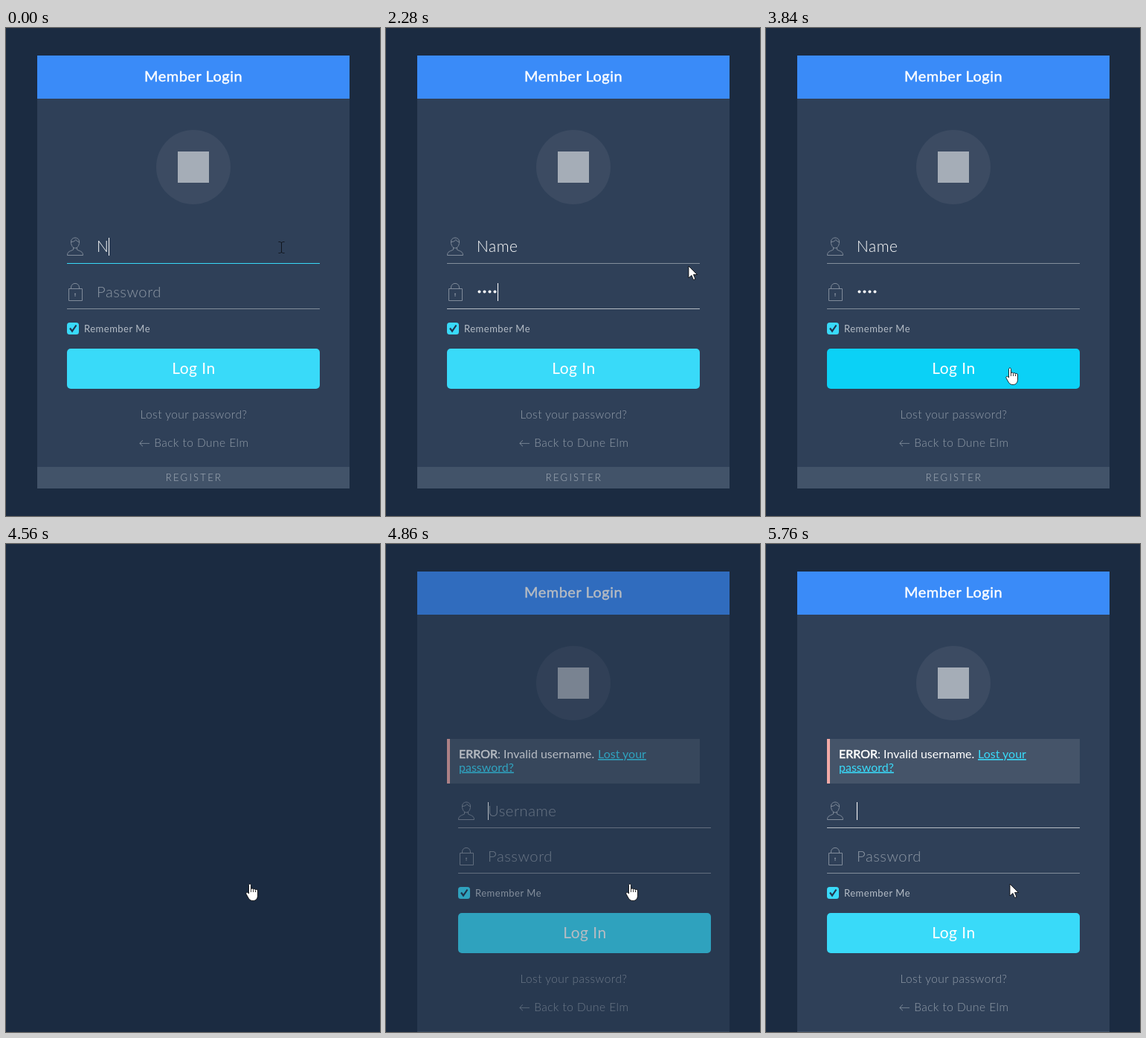
Write an HTML page that moves like this. It is 503 by 656 pixels and loops after 5.88 s.

```html
<!DOCTYPE html>
<html lang="en">
<head>
<meta charset="utf-8">
<title>Member Login</title>
<style>
  html, body { margin: 0; width: 100%; height: 100%; overflow: hidden; background: #1b2b41; }
  svg { display: block; width: 503px; height: 656px; }
  text { font-family: Lato, "Open Sans", sans-serif; white-space: pre; }
  .mid { text-anchor: middle; }
  .title { font-size: 20px; letter-spacing: .5px; fill: #fff; stroke: #fff; stroke-width: .4; }
  .typed { font-size: 21px; font-weight: 300; letter-spacing: .5px; fill: #fff; }
  .hint { font-size: 20.3px; font-weight: 300; letter-spacing: .5px; fill: #8d97a4; }
  .small { font-size: 13px; letter-spacing: .5px; fill: #b4bcc6; }
  .login { font-size: 21px; letter-spacing: .5px; fill: #fff; }
  .link { font-size: 15.5px; font-weight: 300; letter-spacing: .45px; fill: #929ca9; }
  .register { font-size: 13px; font-weight: 300; letter-spacing: 2.3px; fill: #a9b2bd; }
  .notice { font-size: 16px; fill: #fff; }
  .notice .strong { stroke: #fff; stroke-width: .5; }
  .notice .cyan { fill: #39daf9; text-decoration: underline; }
  .icon { fill: none; stroke: #808b9a; stroke-width: 1; }
  .beam { fill: none; stroke: #10151d; stroke-width: 1; }
  .white { fill: #fff; stroke: #000; stroke-width: .8; stroke-linejoin: round; }
</style>
</head>
<body>
<svg viewBox="0 0 503 656">
  <g id="card">
    <rect id="panel" x="42" y="37" width="420" height="582" fill="#2f4058"/>
    <rect x="42" y="37" width="420" height="58" fill="#3a8bf8"/>
    <text class="title mid" x="252" y="72">Member Login</text>
    <circle cx="252" cy="187" r="50" fill="#3c4b62"/>
    <rect x="231" y="166" width="42" height="42" fill="#a5adb7"/>

    <g id="error" class="notice">
      <rect x="82" y="262" width="340" height="60" fill="#455469"/>
      <rect x="82" y="262" width="4" height="60" fill="#f2aaa6"/>
      <text x="98" y="288"><tspan class="strong">ERROR</tspan>: Invalid username.</text>
      <text class="cyan" x="285" y="288">Lost your</text>
      <text class="cyan" x="98" y="305.5">password?</text>
    </g>

    <g id="lower">
      <g id="form">
        <path class="icon" d="M87.5 288C87 280 99 280 98.5 288C98.5 292 96 296 93 296S87.5 292 87.5 288ZM88 287.5C91 287.5 93 286 94 284.5C95 286.5 97 287.5 98.500 287.5M90.500 295V298C87 300 82.500 300 82.500 305.500H103.500C103.500 300 99 300 95.500 298V295"/>
        <text id="name" class="typed" x="122" y="301"></text>
        <text id="userHint" class="hint" x="122" y="301">Username</text>
        <rect id="userLine" x="82" y="316" width="340" height="1"/>

        <path class="icon" d="M84.500 350.500H102.500V366.500H84.500ZM87.500 350.500V349C87.500 341.500 98.500 341.500 98.500 349V350.500M93 356.500V361M92 357.500H94"/>
        <text id="passHint" class="hint" x="122" y="362">Password</text>
        <g id="dots" fill="#fff">
          <circle cx="125.500" cy="354.500" r="2"/>
          <circle cx="132.500" cy="354.500" r="2"/>
          <circle cx="139.500" cy="354.500" r="2"/>
          <circle cx="146.500" cy="354.500" r="2"/>
        </g>
        <rect id="passLine" x="82" y="377" width="340" height="1"/>
        <rect id="caret" width="1" height="24" fill="#fff"/>

        <rect x="82" y="396" width="16" height="16" rx="3.500" fill="#39daf9"/>
        <path d="M86 403.500L89 407.500L94.500 399.500" fill="none" stroke="#22364f" stroke-width="2.200"/>
        <text class="small" x="105" y="409">Remember Me</text>
        <rect id="button" x="82" y="431" width="340" height="54" rx="5"/>
        <text class="login mid" x="252.500" y="465">Log In</text>
      </g>
      <text class="link mid" x="252.500" y="525">Lost your password?</text>
      <text class="link mid" x="252.500" y="563">← Back to Dune Elm</text>
      <rect x="42" y="590" width="420" height="29" fill="#425369"/>
      <text class="register mid" x="253" y="609">REGISTER</text>
    </g>
  </g>

  <g id="pointer">
    <path id="beam" class="beam" d="M-3.500-7.500H-1.500L.5-6.500L2.500-7.500H4.500M.5-7V7M-3.500 7.500H-1.500L.5 6.500L2.500 7.500H4.500"/>
    <path id="arrow" class="white" d="M0 0V16L4 12.500L6.500 18.500L9 17.500L6.500 11.500H11.500Z"/>
    <g id="hand">
      <path class="white" d="M-1.500 13V1.500C-1.500-.5 1.500-.5 1.500 1.500V7C2 5.500 4.500 5.700 4.500 7.500C5 6.200 7.500 6.500 7.500 8C8 7 10.500 7.300 10.500 9V15C10.500 20 8 22.500 4 22.500C0 22.500-1.500 20-3 17L-5 13.500C-5.500 11-3 10.500-1.500 13Z"/>
      <path d="M1.500 7V11M4.500 8V11M7.500 8.500V11" stroke="#000" stroke-width=".8"/>
    </g>
  </g>
</svg>

<script>
const LOOP = 5880, TICK = 60, RELOAD = 4560;
const GRAY = '#838e9b', LIGHT = '#b5bcc4', CYAN = '#39daf9', HOVER = '#0bd1f6';
const $ = id => document.getElementById(id);

// Entries are [start ms, ...values]
const NAME = [[0, 'N'], [60, 'Na'], [300, 'Nam'], [420, 'Name']];
const DOTS = [[0, 0], [1440, 1], [1560, 2], [1740, 3], [1920, 4]];
const CARET = [
  [0, 138, 282], [60, 148, 282], [300, 167, 282], [420, 178, 282], [960],
  [1080, 122, 343], [1440, 129, 343], [1560, 136, 343], [1740, 143, 343],
  [1920, 150, 343], [2460], [2940, 150, 343], [3420],
  [4680, 122, 282], [5220], [5760, 122, 282]
];
const POINTER = [
  [0, 'beam', 370, 295], [2280, 'arrow', 407, 320], [2340, 'arrow', 412, 332],
  [2400, 'beam', 412, 350], [2460, 'beam', 408, 364], [2520, 'arrow', 401, 380],
  [2580, 'arrow', 391, 398], [2640, 'arrow', 376, 416], [2700, 'hand', 357, 434],
  [2760, 'hand', 338, 450], [2820, 'hand', 328, 457], [5100, 'arrow', 328, 457]
];
const SHAKE = [15, 30, 15, 0, -15, -30, -15, 0];

const at = (list, t) => list.findLast(e => e[0] <= t).slice(1);
const part = (t, from, to) => Math.min(1, Math.max(0, (t - from) / (to - from)));
const mix = (a, b, p) => `color-mix(in srgb, ${b} ${p * 100}%, ${a})`;
const show = (id, on) => { $(id).style.display = on ? '' : 'none'; };
const move = (id, x, y) => $(id).setAttribute('transform', `translate(${x} ${y})`);

// CSS "ease" curve, solved by bisection
function ease(x) {
  const bez = (a, b, s) => 3 * a * s * (1 - s) ** 2 + 3 * b * s * s * (1 - s) + s ** 3;
  let lo = 0, hi = 1;
  for (let i = 0; i < 20; i++) {
    const s = (lo + hi) / 2;
    if (bez(.25, .25, s) < x) lo = s; else hi = s;
  }
  return bez(.1, 1, lo);
}

function drawForm(t, failed) {
  const leave = part(t, 1020, 1380), refocus = part(t, 4860, 5100);
  const passFocus = leave - part(t, 3600, 3840);
  const dots = failed ? 0 : at(DOTS, t)[0];

  $('name').textContent = failed ? '' : at(NAME, t)[0];
  $('userHint').style.opacity = failed ? 1 - refocus : 0;
  $('passHint').style.opacity = failed ? 1 : 1 - leave;
  [...$('dots').children].forEach((dot, i) => { dot.style.opacity = i < dots ? 1 : 0; });

  $('userLine').style.fill = failed ? mix(GRAY, LIGHT, refocus) : mix(CYAN, GRAY, leave);
  $('passLine').style.fill = failed ? GRAY : mix(GRAY, LIGHT, passFocus);
  $('button').style.fill = failed ? CYAN : mix(CYAN, HOVER, part(t, 2760, 3060));

  const [x, y] = at(CARET, t);
  show('caret', x);
  if (x) move('caret', x, y);
}

function render(t) {
  const failed = t >= RELOAD;
  const shaking = t >= 4660 && t < 5100;
  $('card').style.opacity = failed ? ease(part(t, 4700, 5100)) : 1;
  $('panel').setAttribute('height', failed ? 647 : 582);
  show('error', failed);
  move('lower', 0, failed ? 65 : 0);
  move('form', shaking ? SHAKE[Math.floor((t - 4660) / 20) % 8] : 0, 0);
  drawForm(t, failed);

  const [kind, x, y] = at(POINTER, t);
  for (const id of ['beam', 'arrow', 'hand']) show(id, id === kind);
  move('pointer', x, y);
}

const start = performance.now();
function frame() {
  const t = (performance.now() - start) % LOOP;
  render(Math.floor(t / TICK) * TICK);
  requestAnimationFrame(frame);
}
frame();
</script>
</body>
</html>
```
